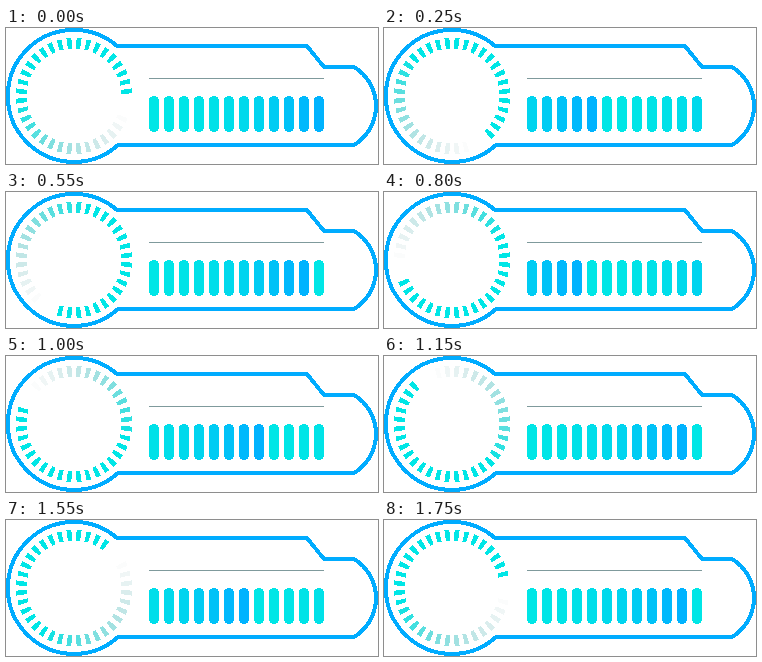
An HTML page that plays this animation: 372 by 136 pixels, repeating every 1800 ms.

```html
<!DOCTYPE html>
<html lang="en">
<head>
<meta charset="utf-8">
<title>Loading panel</title>
<style>
  html, body { margin: 0; width: 100%; height: 100%; overflow: hidden; background: #fff; }
  svg { display: block; width: 372px; height: 136px; shape-rendering: crispEdges; }
</style>
</head>
<body>
<svg viewBox="0 0 372 136">
  <path fill="none" stroke="#00acff" stroke-width="4" stroke-linejoin="round"
    d="M111 18H301L318 39H348A45.6 45.6 0 0 1 348 117H112A66 66 0 1 1 111 18Z"/>
  <path d="M143 50.5H318" stroke="#7f9a9c" stroke-width="1"/>
  <g id="ticks"></g>
  <g id="bars"></g>
</svg>
<script>
const LOOP = 1800, STEP = 50, TICKS = 36, BARS = 12;
const BLUE = [0, 178, 255], CYAN = [0, 230, 230], GREY = [120, 160, 160];

const clamp = v => Math.min(1, Math.max(0, v));
const mix = (a, b, k) => `rgb(${a.map((v, i) => Math.round(v + (b[i] - v) * k))})`;
const mod = (a, n) => ((a % n) + n) % n;

function addShapes(id, tag, count, attrsOf) {
  const group = document.getElementById(id);
  return Array.from({ length: count }, (_, i) => {
    const shape = document.createElementNS(group.namespaceURI, tag);
    for (const [name, value] of Object.entries(attrsOf(i))) shape.setAttribute(name, value);
    return group.appendChild(shape);
  });
}

const ticks = addShapes('ticks', 'path', TICKS, i => ({
  d: 'M47.5 -1.9L58 -2.5V2.5L47.5 1.9Z',
  transform: `translate(68 68) rotate(${i * 10 - 5})`
}));
const bars = addShapes('bars', 'rect', BARS, i => ({
  x: 143 + i * 15, y: 68, width: 10, height: 36, rx: 4.5
}));

// cubic-bezier(.25, .1, .25, 1)
function ease(x) {
  let lo = 0, hi = 1;
  for (let i = 0; i < 20; i++) {
    const s = (lo + hi) / 2;
    const bx = 0.75 * s * (1 - s) + s ** 3;
    if (bx < x) lo = s; else hi = s;
  }
  const s = lo;
  return 0.3 * s * (1 - s) ** 2 + 3 * s * s * (1 - s) + s ** 3;
}

function draw(time) {
  const step = Math.floor((time % LOOP) / STEP);
  ticks.forEach((tick, i) => {
    const age = mod(step - i, TICKS);
    const fade = clamp((age - 18) / 15.5);
    tick.setAttribute('fill', mix(CYAN, GREY, fade));
    tick.setAttribute('opacity', 1 - fade);
  });
  bars.forEach((bar, i) => {
    const age = mod(step - 1 - i, BARS) + 0.5;
    bar.setAttribute('fill', mix(BLUE, CYAN, ease(age / BARS)));
  });
}

const start = performance.now();
function loop() {
  draw(performance.now() - start);
  requestAnimationFrame(loop);
}
draw(0);
requestAnimationFrame(loop);
</script>
</body>
</html>
```
